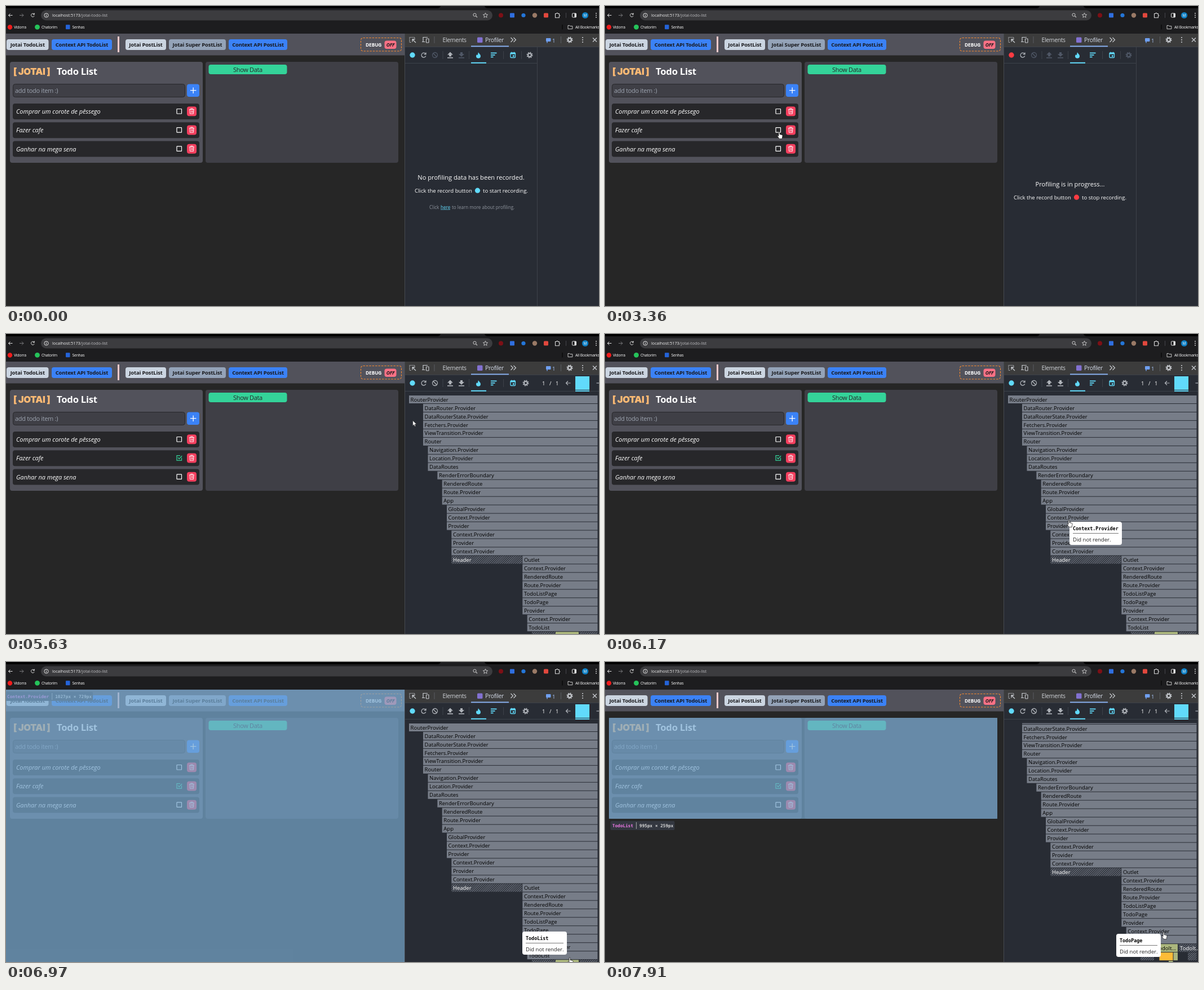
An HTML page for the animation above (8 s loop, 1052 by 532 pixels).

```html
<!DOCTYPE html>
<html lang="en">
<head>
<meta charset="utf-8">
<title>Profiler demo</title>
<style>
html, body { margin: 0; width: 100%; height: 100%; overflow: hidden; background: #262626; }
svg { display: block; width: 1052px; height: 532px; }
text { font-family: "Open Sans", "Noto Sans", sans-serif; white-space: pre; }
.mono { font-family: "DejaVu Sans Mono", "Noto Sans Mono", monospace; font-weight: bold; }
.b { font-weight: 700; letter-spacing: -.015em; }
.black { font-family: Inter, "Open Sans", sans-serif; font-weight: 900; letter-spacing: -.03em; }
.i { font-style: italic; }
.m { text-anchor: middle; }
.tight { letter-spacing: -.03em; }
</style>
</head>
<body>
<svg id="stage" viewBox="0 0 1052 532"></svg>
<script>
const rect = (x, y, w, h, fill, r = 0, more = '') =>
  `<rect x="${x}" y="${y}" width="${w}" height="${h}" rx="${r}" fill="${fill}" ${more}/>`;
const dot = (x, y, r, fill, more = '') => `<circle cx="${x}" cy="${y}" r="${r}" fill="${fill}" ${more}/>`;
const text = (x, y, str, size, fill = '#fff', cls = '') =>
  `<text x="${x}" y="${y}" font-size="${size}" fill="${fill}" class="${cls}">${str}</text>`;
const line = (d, color, w = 1, more = '') =>
  `<path d="${d}" fill="none" stroke="${color}" stroke-width="${w}" ${more}/>`;
const group = (id, body, more = '') => `<g id="${id}" ${more}>${body}</g>`;

const BLUE = '#61dafb', DIM = '#4f5766', ICON = '#afb3b9', BAR = '#777d88', PANEL = '#282c34', EDGE = '#3d424a';
const ROW = 14.97, TOP = 109;

const gear = (x, y, c) => dot(x, y, 2.9, 'none', `stroke="${c}" stroke-width="2"`) +
  dot(x, y, 4.6, 'none', `stroke="${c}" stroke-width="1.8" stroke-dasharray="1.9 1.71"`);
const arrowIcon = (x, c, up) => {
  const s = up ? 1 : -1, y = up ? 85.5 : 86;
  return `<path d="M${x} ${y - 4 * s}l5 ${5 * s}h-3v${3 * s}h-4v${-3 * s}h-3z" fill="${c}"/>` + rect(x - 5, 91, 10, 1.6, c);
};
const magnifier = (x, y, c) => dot(x, y, 2.6, 'none', `stroke="${c}"`) + line(`M${x + 2} ${y + 2}l2.5 2.5`, c, 1.2);

function browser() {
  let s = rect(0, 0, 1052, 49, '#1d1d1f') + rect(0, 0, 1052, 4, '#000') +
    '<path d="M765 4q5 0 6-4h78q1 4 6 4z" fill="#1d1d1f"/>' +
    rect(62, 7.5, 801, 18, '#3c3c3f', 9);
  s += line('M11.5 16.5h-7m3-3l-3 3l3 3', '#e3e3e3') + line('M24 16.5h7m-3-3l3 3l-3 3', '#77777a') +
    line('M50 14.5a3 3 0 1 0 .3 3M50.3 12.5v2.6h-2.6', '#e3e3e3') +
    dot(71.5, 16.5, 3.6, 'none', 'stroke="#e3e3e3"') + line('M71.5 16v2.5m0-4.3v.9', '#e3e3e3') +
    text(82, 19.2, 'localhost:5173<tspan fill="#bdbdc0">/jotai-todo-list</tspan>', 7.4, '#f2f2f2') +
    magnifier(831.5, 15.7, '#d0d0d0') +
    line('M850.5 12.3l1.2 2.8l3 .2l-2.3 2l.7 3l-2.6-1.6l-2.6 1.6l.7-3l-2.3-2l3-.2z', '#d0d0d0', .9);
  s += dot(878, 16.5, 4, '#7d1016') + rect(894, 12.5, 8, 8, '#2f6fe0', 1) + dot(918, 16.5, 3.6, '#2476d8') +
    dot(938, 16.5, 4.2, '#9a7a66') + rect(954, 12.5, 8, 8, '#e2483d', 1.5) +
    line('M974.5 13.5h2.2a1 1 0 0 1 2.4 0h2.2v2.4a1 1 0 0 1 0 2.4v2.4h-6.8z', '#d8d8d8', 1.1) +
    rect(993, 12, 1, 9, '#45454a') + rect(1004.5, 13, 7, 7, 'none', 1, 'stroke="#e3e3e3"') + rect(1008.5, 13, 3, 7, '#e3e3e3') +
    dot(1027.5, 16.5, 5.6, '#0e7fc4') + text(1027.5, 19, 'M', 6.5, '#fff', 'm') +
    [13, 16.5, 20].map(y => dot(1047, y, .9, '#ddd')).join('');
  s += dot(7, 37.5, 4.2, '#f01c1c') + text(14, 39.6, 'Vidorra', 6.8, '#fff', 'tight') +
    dot(55.5, 37.3, 4.4, '#25c35a') + text(63, 39.6, 'Chatorim', 6.8, '#fff', 'tight') +
    rect(106, 33.3, 7.5, 8, '#2463d8', 1) + text(117.5, 39.6, 'Senhas', 6.8, '#fff', 'tight') +
    rect(986.5, 33, 1, 8.5, '#000') + line('M997 34.5h2.8l1 1.2h4v5h-7.8z', '#d8d8d8', .9) +
    text(1010, 39.6, 'All Bookmarks', 6.8, '#fff', 'tight');
  return s;
}

function page() {
  const button = (x, w, fill, str) => rect(x, 59, w, 19, fill, 4) + text(x + w / 2, 72.3, str, 9.4, '#18181b', 'b m');
  let s = rect(0, 49, 707, 483, '#262626') + rect(0, 49, 707, 38.5, '#52525b') +
    button(1, 74.5, '#cbd5e1', 'Jotai TodoList') + button(81, 107, '#3b82f6', 'Context API TodoList') +
    rect(198, 54, 3, 28, '#fecaca') +
    button(212, 72, '#cbd5e1', 'Jotai PostList') + button(289, 101, '#94a3b8', 'Jotai Super PostList') +
    button(395, 104, '#3b82f6', 'Context API PostList') +
    rect(629.5, 56.5, 72, 23.5, 'none', 4, 'stroke="#f98a30" stroke-width="1.1" stroke-dasharray="3.4 2"') +
    text(638, 71.8, 'DEBUG', 8.4, '#fff', 'b') + rect(671.5, 61.5, 21, 14.5, '#fb7185', 4) +
    text(682, 71.8, 'OFF', 8.4, '#18181b', 'b i m');
  s += rect(7, 99, 342, 179, '#52525b', 4) + rect(354, 99, 342, 179, '#3f3f46', 4) +
    text(13, 122, '[ JOTAI ]', 16.6, '#fdba74', 'black') + text(90, 122, 'Todo List', 16.7, '#fff', 'b') +
    rect(12.5, 138.5, 305, 23, '#3f3f46', 4, 'stroke="#27272a"') + text(16, 154, 'add todo item :)', 11, '#9ca3af', 'tight') +
    rect(321, 138.5, 22, 22.5, '#3b82f6', 4) + line('M327 149.7h10.4m-5.2-5.2v10.4', '#fff', 1.3) +
    rect(359.5, 104, 139, 17, '#34d399', 4) + text(429, 116.6, 'Show Data', 11, '#27272a', 'm tight');
  ['Comprar um corote de pêssego', 'Fazer cafe', 'Ganhar na mega sena'].forEach((name, k) => {
    const y = 173 + k * 33.2;
    const box = rect(303, y + 9.5, 8.5, 8.5, 'none', .5, 'stroke="#fff" stroke-width="1.2"');
    s += rect(12, y, 331, 28, '#27272a', 4) + text(18, y + 18.2, name, 10.9, '#fff', 'i') +
      (k === 1 ? group('empty', box) + group('done', line(`M311.5 ${y + 13}v5h-8.5v-8.5h6M305 ${y + 12.8}l2.2 2.3l5-5.3`, '#34d399', 1.2)) : box) +
      rect(321, y + 5.3, 17, 17, '#f43f5e', 4) +
      line(`M325 ${y + 10.5}h9m-6.2 0v-1.6h3.4v1.6m-5.2 0l.5 7.6h6l.5-7.6m-4.1 1.8v4m2.2-4v4`, '#fff', .9);
  });
  return s;
}

function devtools() {
  const rules = xs => xs.map(x => rect(x, 80, 1, 14, EDGE)).join('');
  const tip = (id, title, ty, a, b, color, by) => group(id,
    text(825, ty, title, 11.1, '#fff', 'm') + text(725, by, a, 9.6) + dot(836.5, by - 3.8, 4.6, color) + text(846, by, b, 9.6));
  let s = rect(707, 49, 345, 483, PANEL) + rect(707, 49, 1, 483, '#45494f') + rect(708, 49, 344, 23, '#3c3c3c') + rect(708, 72, 344, 1, EDGE);
  s += line('M725 57.5v-2h-9v9h3', '#c7cacf', 1.1, 'stroke-dasharray="1.6 1"') + line('M727 65l-6-6m0 4.5v-4.5h4.5', '#c7cacf', 1.3) +
    line('M748 55.5h-8v8h-2m2 0h3.5', '#c7cacf', 1.2) + rect(745.5, 58, 4.5, 7, 'none', .5, 'stroke="#c7cacf" stroke-width="1.1"') +
    rect(759.5, 54, 1, 12, '#5a5d62') + text(774.5, 64, 'Elements', 10.4, '#d0d3d8', 'tight') +
    rect(836, 55.5, 9.5, 9.5, '#8271d1', 1.5) + text(850, 64, 'Profiler', 10.4, '#d5dcea', 'tight') + rect(825, 70.5, 67, 1.8, '#8ab4f8') +
    line('M895.5 56l4 4l-4 4m5-8l4 4l-4 4', '#c7cacf', 1.2) +
    rect(958, 57, 8.5, 6, '#6f9ff0', 1) + line('M960 65.5v-3', '#6f9ff0', 1.5) + text(969, 64.5, '1', 9.5, '#a8c7fa') +
    rect(984, 54, 1, 12, '#5a5d62') + gear(1000, 60, '#c7cacf') +
    [56, 60, 64].map(y => dot(1023, y, 1.1, '#c7cacf')).join('') + line('M1041 56.5l7 7m0-7l-7 7', '#c7cacf', 1.3);

  s += '<circle id="rec" cx="721" cy="87" r="4.7"/>' +
    line('M744.6 85.2a4 4 0 1 0 .2 3.4M745 82.5v3.2h-3.4', ICON, 1.3) +
    group('clear', dot(761, 87, 4.5, 'none') + '<path d="M758 84l6 6"/>', 'stroke-width="1.3"') +
    rules([774.5, 821, 882]) + group('up', '') + group('down', '') +
    `<path d="M838 82c1 2.5 4 3.5 4 7a4 3.7 0 0 1-8 0c0-1.6.8-2.3 1.5-3.3c.3 1 .6 1.3 1.2 1.6c.6-1.8.4-3.4 1.3-5.3z" fill="${BLUE}"/>` +
    rect(860, 82.5, 10.5, 1.8, BLUE) + rect(860, 86, 7.5, 1.8, BLUE) + rect(860, 89.5, 4.5, 1.8, BLUE) +
    rect(895, 83, 8.5, 8.5, 'none', 1, `stroke="${BLUE}" stroke-width="1.3"`) + rect(895, 83, 8.5, 2.5, BLUE) +
    rect(899, 87.3, 2.6, 2.6, BLUE) + line('M897 81.5v2m4.5-2v2', BLUE, 1.2);

  s += group('narrow', rules([914]) + rect(708, 101, 234, 1, EDGE) + rect(942, 73, 1, 459, EDGE) + rect(825, 99.8, 27, 2, BLUE) +
      group('gearOn', gear(929, 87, ICON)) + group('gearOff', gear(929, 87, DIM))) +
    tip('idle', 'No profiling data has been recorded.', 307.5, 'Click the record button', 'to start recording.', BLUE, 331) +
    group('learn', text(751, 359.5, 'Click', 8.1, '#8f959e') + text(771, 359.5, 'here', 8.1, BLUE) +
      rect(771, 360.6, 17, .7, BLUE) + text(791, 359.5, 'to learn more about profiling.', 8.1, '#8f959e')) +
    tip('busy', 'Profiling is in progress...', 319.5, 'Click the record button', 'to stop recording.', '#ff3b42', 343) +
    group('wait', text(825, 323, 'Processing data...', 11.1, '#fff', 'm') + text(825, 343, 'This should only take a minute.', 9.6, '#fff', 'm'));
  return s;
}

const rows = [
  [715, 'RouterProvider'],
  [740, 'DataRouter.Provider DataRouterState.Provider Fetchers.Provider ViewTransition.Provider Router'],
  [748.5, 'Navigation.Provider Location.Provider DataRoutes'],
  [765.3, 'RenderErrorBoundary'],
  [773.7, 'RenderedRoute Route.Provider App'],
  [782, 'GlobalProvider Context.Provider Provider'],
  [790.3, 'Context.Provider Provider Context.Provider'],
  [916.3, 'Outlet Context.Provider RenderedRoute Route.Provider TodoListPage TodoPage Provider'],
  [924.7, 'Context.Provider TodoList'],
].flatMap(([x, names]) => names.split(' ').map(name => ({ x, name })));

function flame() {
  const bar = (k, x, end, fill, str = '', color = '#000') => {
    const y = TOP + k * ROW;
    return rect(x, y, end - x, ROW - 1, fill) + (str && text(x + 2.6, y + 10.6, str, 9.5, color));
  };
  const hatch = 'url(#hatch)', green = '#abb67d', right = 1049.5;
  const bars = rows.map((r, k) => bar(k, r.x, right, BAR, r.name)).join('') +
    bar(19, 790.3, 915.5, hatch, 'Header', '#fff') +
    bar(28, 933, 974.5, hatch) + bar(28, 975, 1016, green, 'TodoIt...') + bar(28, 1017.5, right, hatch, 'TodoIt...', '#fff') +
    bar(29, 950, 974, hatch) + bar(29, 983.5, 1007.5, '#febc38') + bar(29, 1008.5, 1016, green) + bar(29, 1034, right, hatch) +
    bar(30, 1000, 1007.5, green);
  return rect(708, 101, 344, 1, EDGE) + rect(825, 99.8, 27, 2, BLUE) + gear(922, 87, ICON) +
    text(951, 90.5, '1', 9.5) + text(964, 90.5, '/', 9.5) + text(975, 90.5, '1', 9.5) +
    line('M1001.5 87h-8m3.5-3.5l-3.5 3.5l3.5 3.5', ICON, 1.2) + rect(1047.5, 86.4, 5, 1.2, ICON) +
    rect(1010, 75, 25, 24, BLUE) + rect(1010, 100, 25, 2, BLUE) +
    `<g clip-path="url(#chart)">${group('bars', bars)}</g>`;
}

function highlight(id, x, y, w, h, lx, ly, name, size) {
  const split = lx + 3.5 + name.length * 4.64 + 5;
  const label = rect(lx, ly, split + size.length * 4.64 + 8 - lx, 16, '#333740', 2) +
    text(lx + 3.5, ly + 10.7, name, 7.7, '#ee78e6', 'mono') + rect(split, ly + 2, 1, 12, '#aaa') +
    text(split + 6, ly + 10.7, size, 7.7, '#d7d7d7', 'mono');
  return group(id, label + rect(x, y, w, h, 'rgba(120,170,210,.7)'));
}

stage.innerHTML = `<defs>
  <pattern id="hatch" width="2.7" height="2.7" patternUnits="userSpaceOnUse" patternTransform="rotate(45)">
    <rect width="1.1" height="2.7" fill="${BAR}"/></pattern>
  <clipPath id="chart"><rect x="708" y="108.5" width="344" height="424"/></clipPath></defs>` +
  page() + highlight('hiAll', 0, 49, 707, 483, -1.5, 53, 'Context.Provider', '1027px × 729px') +
  highlight('hiList', 7, 99, 689, 179, 9.5, 282, 'TodoList', '995px × 259px') +
  browser() + devtools() + group('flame', flame()) +
  group('tooltip', '<rect id="tipBox" height="41" rx="4" fill="#fff"/>' +
    '<text id="tipName" class="mono" x="6" y="14.6" font-size="8.4"></text>' +
    '<rect id="tipRule" x="6" y="20" height=".8" fill="#555"/>' + text(6, 35, 'Did not render.', 9.5, '#222')) +
  group('arrow', '<path d="M0 0v9.2l2.1-2l1.4 3.2l1.5-.6l-1.4-3.2h2.9z" fill="#fff" stroke="#111" stroke-width=".5"/>') +
  group('hand', '<path d="M-1 1a1 1 0 0 1 2 0v3.6l3.9.8q1.3.4 1.2 1.8l-.7 3.2v2h-5.2l-2.9-4.2q-.8-1.2.2-1.5q.8-.1 1.5 1z" fill="#fff" stroke="#111" stroke-width=".7"/>');

// Pointer stops: time, x, y
const stops = [
  [130, 975, 524], [260, 791, 432], [455, 791, 432], [900, 671, 112], [1130, 718, 93], [1605, 718, 93],
  [1880, 617, 140], [2145, 617, 140], [2610, 357, 152], [2745, 357, 152], [3360, 309, 223], [3755, 309, 223],
  [4100, 448, 207], [4235, 448, 207], [4380, 433, 204], [4840, 718, 93], [5170, 718, 94], [5370, 714, 140],
  [5565, 714, 140], [5970, 823, 330], [6170, 823, 330], [6970, 1000, 524], [7175, 1000, 524], [7700, 991, 479], [8000, 991, 479],
];
const handTimes = [[1080, 1680], [3200, 3820], [4780, 5220], [5690, 8000]];
const el = id => document.getElementById(id);
const show = (id, on) => { el(id).style.display = on ? '' : 'none'; };
const clamp = v => Math.min(1, Math.max(0, v));
const ease = v => v * v * (3 - 2 * v);

function pointer(t) {
  const k = stops.findIndex(s => s[0] > t);
  if (k < 1) return null;
  const [t0, x0, y0] = stops[k - 1], [t1, x1, y1] = stops[k], f = ease((t - t0) / (t1 - t0));
  return [x0 + (x1 - x0) * f, y0 + (y1 - y0) * f];
}

function hovered(x, y) {
  const k = Math.floor((y - TOP) / ROW), row = rows[k];
  if (k === 19 && x > 790 && x < 916) return 'Header';
  return row && x >= row.x ? row.name : '';
}

function placeTooltip(x, y) {
  const name = hovered(x, y), w = Math.max(67, name.length * 5.06) + 12;
  show('tooltip', name);
  if (!name) return;
  const tx = x + w > 1046 ? x - 5 - w : x + 1, ty = y + 44 > 532 ? y - 46 : y + 3;
  el('tooltip').setAttribute('transform', `translate(${tx} ${ty})`);
  el('tipName').textContent = name;
  el('tipBox').setAttribute('width', w);
  el('tipRule').setAttribute('width', w - 12);
}

function draw(t) {
  const recording = t >= 2210 && t < 5040, charted = t >= 5370, idle = t < 2210;
  show('idle', idle); show('learn', idle); show('busy', recording);
  show('wait', t >= 5040 && !charted);
  show('narrow', !charted); show('flame', charted);
  show('gearOn', !recording); show('gearOff', recording);
  show('empty', t < 3560); show('done', t >= 3560);
  el('rec').setAttribute('fill', recording ? '#ff3b42' : t >= 1400 && t < 1470 ? '#a2e9fc' : BLUE);
  el('clear').setAttribute('stroke', charted ? ICON : DIM);
  el('up').innerHTML = arrowIcon(788, recording ? DIM : ICON, true);
  el('down').innerHTML = arrowIcon(808, charted ? ICON : DIM, false);
  show('hiAll', t >= 6230 && t < 7240);
  show('hiList', t >= 7240);
  el('bars').setAttribute('transform', `translate(0 ${-28 * ease(clamp((t - 7700) / 200))})`);

  const p = pointer(t), hand = handTimes.some(([a, b]) => t >= a && t < b);
  show('arrow', p && !hand);
  show('hand', p && hand);
  show('tooltip', false);
  if (!p) return;
  el(hand ? 'hand' : 'arrow').setAttribute('transform', `translate(${p[0]} ${p[1]})`);
  if (charted) placeTooltip(...p);
}

const start = performance.now();
function tick() {
  draw((performance.now() - start) % 8000);
  requestAnimationFrame(tick);
}
tick();
</script>
</body>
</html>
```
